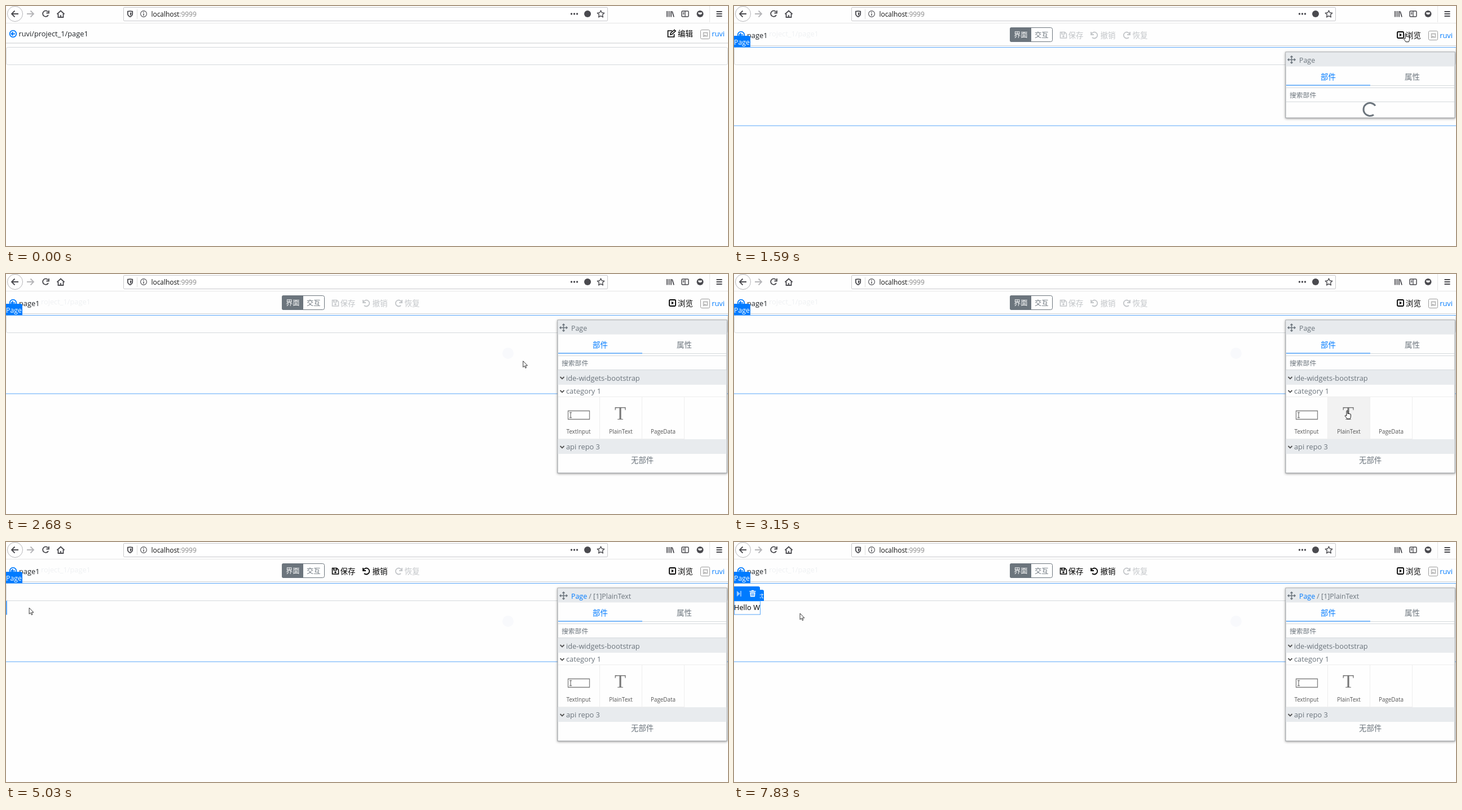
Animation of 1280 by 427 pixels, one loop 8 s. Source, as an HTML page:

```html
<!DOCTYPE html>
<html lang="zh-CN">
<head>
<meta charset="utf-8">
<title>Page editor</title>
<style>
html, body { margin: 0; height: 100%; overflow: hidden; background: #fefefe; }
svg { display: block; width: 1280px; height: 427px; font: 12.8px "Open Sans", "Noto Sans CJK SC", "Noto Sans CJK", sans-serif; }
text { white-space: pre; }
.cjk { font-size: 13.4px; }
.tag { font-size: 12.3px; fill: #fff; }
.tiny { font-size: 9.9px; fill: #555; text-anchor: middle; }
.line { fill: none; stroke: currentColor; stroke-width: 1.8; }
.blue { fill: #007bff; }
.edge { fill: none; stroke: #58a6f8; }
.grey { fill: #6c757d; }
.rule { fill: none; stroke: #d5d9dc; }
.off { color: #c3c6c9; }
.panel { fill: #fefefe; stroke: #9a9ea2; filter: drop-shadow(0 1px 2px #0006); }
</style>
</head>
<body>
<svg viewBox="0 0 1280 427">
  <defs>
    <path id="undo" class="line" stroke-width="2" d="M1 1v5h5M1.500 5.500A5.500 5.500 0 1 1 3 11"/>
    <path id="chevron" class="line" d="M0 0l3.500 3.500 3.500-3.500" color="#555"/>
    <g id="avatar"><rect x="1231.500" y=".5" width="16" height="16" rx="2" fill="#fff" stroke="#999"/><path class="line" stroke-width="1" color="#bbb" d="M1236.500 5.500h7v6h-7zM1236 13l3-3 3 2"/></g>
    <g id="back" class="line" color="#007bff" stroke-width="1.500"><circle r="5.800"/><path d="M3.500 0h-6M0-3l-3 3 3 3"/></g>
  </defs>

  <!-- browser bar -->
  <g color="#4a4a4f">
    <path d="M0 30.500H1280" stroke="#e6e6e6"/>
    <path d="M1247.500 0V29" stroke="#e6e6e6"/>
    <circle cx="16" cy="14" r="13.500" fill="#fff" stroke="#b5b5b8"/>
    <path class="line" d="M22 14H10M15.500 8.500L10 14l5.500 5.500"/>
    <path class="line" color="#b5b5b8" d="M37 14h12M43.500 8.500L49 14l-5.500 5.500"/>
    <path class="line" d="M74.500 10.500A5.200 5.200 0 1 0 75 16M76 8v4.500h-4.500"/>
    <path class="line" d="M90.500 14.500L97 8.500l6.500 6M92.500 14v6h9v-6M97 20v-4"/>
    <rect x="208.500" y="2.500" width="858" height="24" rx="1.500" fill="#fff" stroke="#c9c9cc"/>
    <path class="line" stroke-width="1.500" d="M215.800 9.700q4.200-1 8.400 0v4q0 3.500-4.200 5.500-4.200-2-4.200-5.500z"/>
    <path d="M220 11.500l2.300.3v2.500q-.3 2-2.300 3z" fill="#4a4a4f"/>
    <path d="M232.500 6V23" stroke="#ddd"/>
    <circle class="line" stroke-width="1" style="stroke-width:1.100" cx="244" cy="14" r="5.400"/>
    <path d="M244 10.500v1.600M244 13.300v4" stroke="#4a4a4f" stroke-width="1.400"/>
    <text x="257.500" y="18.500" font-size="11.900" fill="#111">localhost<tspan fill="#888">:9999</tspan></text>
    <g fill="#4a4a4f"><circle cx="1002.500" cy="14" r="1.700"/><circle cx="1007.500" cy="14" r="1.700"/><circle cx="1012.500" cy="14" r="1.700"/><circle cx="1031" cy="14" r="6"/></g>
    <path class="line" stroke-linejoin="round" style="stroke-width:1.400" d="M1054.500 8l1.900 4 4.300.5-3.200 3 .9 4.400-3.900-2.200-3.900 2.200.9-4.400-3.200-3 4.300-.5z"/>
    <path class="line" d="M1172 9v10.500M1175.500 9v10.500M1179 9v10.500M1181 9.500l3 10"/>
    <rect class="line" style="stroke-width:1.500" x="1198" y="9" width="12" height="10" rx="1.500"/>
    <path class="line" style="stroke-width:1.300" d="M1204 9v10M1200 11.800h2.500M1200 14h2.500"/>
    <circle cx="1230.500" cy="14" r="6" fill="#4a4a4f"/>
    <path d="M1227 11.500h7q0 3.800-3.500 3.800t-3.500-3.800z" fill="#fff"/>
    <path class="line" d="M1259.500 10h10M1259.500 14h10M1259.500 18h10"/>
  </g>

  <!-- page being edited -->
  <rect class="rule" x=".5" y="73.500" width="1279" height="31" rx="3"/>

  <g id="view">
    <path d="M0 66H1280" stroke="#dadcde" stroke-width="1.500"/>
    <use href="#back" x="12.500" y="49.500"/>
    <text x="22.500" y="54" fill="#212529">ruvi/project_1/page1</text>
    <path class="line" d="M1181 44h-7.500v11h11v-5M1178 51l.5-3 6.500-5.500 2 2-6.500 6z" color="#000" style="stroke-width:1.600"/>
    <text class="cjk" x="1191" y="54">编辑</text>
    <use href="#avatar" y="42"/>
    <text class="blue" x="1274" y="54" text-anchor="end">ruvi</text>
  </g>

  <g id="edit">
    <path d="M0 70.500H1280" stroke="#d0d3d6"/>
    <text x="62" y="54" fill="#eff1f3">roject_1/page1</text>
    <use href="#back" x="12.500" y="51.500"/>
    <text x="23" y="56.500" fill="#212529">page1</text>
    <rect x="489.500" y="38.500" width="75" height="25" rx="3" fill="#fff" stroke="#6c757d"/>
    <path class="grey" d="M527 38v26h-35q-3 0-3-3V41q0-3 3-3z"/>
    <text x="496" y="56" font-size="12.300" fill="#fff">界面</text>
    <text x="533" y="56" font-size="12.300" class="grey">交互</text>
    <g id="tools" class="cjk" fill="currentColor">
      <path class="line" style="stroke-width:1.500" d="M578.500 46.500h8l3 3v7.500h-11zM581 46.500v3.500h5v-3.500"/><circle cx="584" cy="53.700" r="1.800"/>
      <text x="592.500" y="56.500">保存</text>
      <use href="#undo" x="632" y="45"/>
      <text x="649.500" y="56.500">撤销</text>
    </g>
    <g class="cjk off" fill="currentColor">
      <use href="#undo" transform="translate(703 45) scale(-1 1)"/>
      <text x="706.500" y="56.500">恢复</text>
    </g>
    <rect class="line" color="#000" x="1176" y="46" width="11" height="11" rx="1.500"/><path d="M1180 48.500v6l4-3z"/>
    <text class="cjk" x="1191" y="56.500">浏览</text>
    <use href="#avatar" y="44"/>
    <text class="blue" x="1274" y="56.500" text-anchor="end">ruvi</text>
    <circle id="trace" cx="890" cy="141" r="10" fill="#f8f9fc"/>

    <g id="frame">
      <path class="edge" d="M0 73.500H1280M0 213H1280"/>
      <g id="pageTag"><path class="blue" d="M0 73V53h26q3 0 3 3v17z"/><text class="tag" x="0" y="69">Page</text></g>
      <g id="inputTag"><path class="edge" d="M.5 73.500H1279.500V104.500H.5z"/><path class="blue" d="M0 73V53h51q3 0 3 3v17z"/><text class="tag" x="0" y="69">TextInput</text></g>
    </g>

    <g id="plainTag"><path class="blue" d="M0 105V85h50q3 0 3 3v17z"/><text class="tag" x="1" y="100">PlainText</text></g>
    <text id="content" x="0" y="121"></text>
    <rect id="outline" class="edge" x=".5" y="105" height="24"/>
    <g id="actions">
      <path class="blue" d="M-75 105V79h72q3 0 3 3v23z"/>
      <g fill="#fff">
        <path fill-opacity=".6" d="M-57 87v10l-6-5zM-65 87h1.700v10h-1.700zM-41 87v10l6-5zM-34.700 87h1.700v10h-1.700z"/>
        <path d="M-18.500 87h3l1-1.200h3l1 1.200h3v1.600h-11zM-17.700 89.500h9.400l-.7 8h-8z"/>
      </g>
      <path d="M-15 91v5M-13 91v5M-11 91v5" stroke="#007bff"/>
    </g>

    <!-- widget panel -->
    <rect id="panel" class="panel" x="978" y="82" width="300"/>
    <path d="M978.500 82.500h299v25h-299z" fill="#e7eaed"/>
    <path class="line" color="#6c757d" style="stroke-width:1.500" d="M982 95.500h13M988.500 89v13M984 93.500l-2 2 2 2M993 93.500l2 2-2 2M986.500 91l2-2 2 2M986.500 100l2 2 2-2"/>
    <text id="title" class="grey" x="1002" y="100.500" font-size="12.400"><tspan id="root">Page</tspan><tspan id="leaf"> / [1]PlainText</tspan></text>
    <text class="cjk blue" x="1040" y="130.500">部件</text>
    <text class="cjk grey" x="1189" y="130.500">属性</text>
    <path class="rule" d="M1128 141.500h149M979 145.500h298M979 170.500h298"/>
    <path d="M979 141h149" stroke="#4d9ff7" stroke-width="1.500"/>
    <text class="grey" x="985" y="163" font-size="11.800">搜索部件</text>
    <circle id="spinner" cx="1127.500" cy="184" r="11.500" fill="none" stroke="#6c757d" stroke-width="3" pathLength="4" stroke-dasharray="3 1"/>
    <g id="widgets">
      <path d="M978.500 171h299v26h-299zM978.500 294h299v26h-299z" fill="#e8ebee"/>
      <rect id="hover" x="1053" y="218" width="75" height="75" fill="#f2f2f2"/>
      <path d="M979 218.500h298M979 293.500h224M1052.500 218v75M1127.500 218v75M1202.500 218v75" stroke="#eee"/>
      <use href="#chevron" x="982.500" y="183"/><use href="#chevron" x="982.500" y="207"/><use href="#chevron" x="982.500" y="306"/>
      <text class="grey" x="993" y="189.500">ide-widgets-bootstrap</text>
      <text class="grey" x="993" y="213">category 1</text>
      <text class="grey" x="993" y="312">api repo 3</text>
      <text class="cjk grey" x="1108" y="336">无部件</text>
      <path class="line" color="#808080" style="stroke-width:1.300" d="M996.500 243.500h38v15h-38zM999 246.500h4M1001 246.500v9M999 255.500h4"/>
      <text x="1089" y="259" fill="#777" text-anchor="middle" style="font:33px 'Liberation Serif',serif">T</text>
      <text class="tiny" x="1015" y="283.500">TextInput</text>
      <text class="tiny" x="1090" y="283.500">PlainText</text>
      <text class="tiny" x="1165" y="283.500">PageData</text>
    </g>
  </g>

  <g id="pointer">
    <circle id="press" r="10" fill="#ffff60"/>
    <path id="arrow" d="M0 0v11l2.500-2.300 1.700 3.900 1.700-.8-1.700-3.700h3.600z" fill="#fff" stroke="#222" stroke-width=".9"/>
    <path id="hand" d="M-1 1q0-1 1-1t1 1v4.500q1-.8 2 .2 1.200-.6 2 .4 1.500-.3 1.500 1.200v3q0 2-1.500 4.500h-5q-1-2-3.800-5.200 0-2 2.800-.5z" fill="#fff" stroke="#111"/>
    <path id="beam" d="M-2 0h4M0 0v11M-2 11h4" stroke="#222" fill="none"/>
  </g>
</svg>
<script>
const $ = id => document.getElementById(id);
const show = (id, on) => { $(id).style.display = on ? '' : 'none'; };
const within = (t, a, b) => t >= a && t < b;

// pointer path: time, x, y
const path = [
  [0, 1207, 440], [279, 1207, 440], [280, 1207, 424], [600, 1206, 423], [780, 1140, 270],
  [1050, 1188, 78], [1209, 1188, 78], [1210, 1191, 49], [1670, 1191, 49], [1990, 978, 92],
  [2070, 955, 92], [2130, 932, 91], [2360, 932, 91], [2530, 890, 141], [2620, 890, 141],
  [3070, 1087, 243], [3710, 1087, 243], [4250, 38, 118], [4480, 40, 117], [5030, 40, 117],
  [5100, 117, 127], [8000, 117, 127]
];
// text in the new element: time, value
const typing = [
  [3550, '双击输入文本'], [4780, ''], [5730, 'H'], [6280, 'He'], [6800, 'Hel'],
  [6970, 'Hell'], [7200, 'Hello'], [7440, 'Hello '], [7760, 'Hello W']
];

function locate(t) {
  const i = path.findIndex(p => p[0] > t);
  const [t0, x0, y0] = path[i - 1], [t1, x1, y1] = path[i];
  const k = (t - t0) / (t1 - t0);
  return [x0 + (x1 - x0) * k, y0 + (y1 - y0) * k];
}

function draw(t) {
  const [x, y] = locate(t);
  const editing = t >= 1400, loaded = t >= 1670, added = t >= 3550;
  const selected = t >= 4630, typed = t >= 5730;
  const overInput = within(t, 1990, 2430);
  const overText = within(t, 4130, 5030);
  const overTile = within(t, 3000, 3760);

  show('view', !editing);
  show('edit', editing);
  show('trace', t >= 2620);
  show('frame', !within(t, 4630, 5030));
  show('pageTag', !overInput);
  show('inputTag', overInput);
  $('tools').setAttribute('class', added ? 'cjk' : 'cjk off');

  show('spinner', !loaded);
  show('widgets', loaded);
  show('hover', overTile);
  $('panel').setAttribute('height', loaded ? 272 : 117);
  $('spinner').setAttribute('transform', `rotate(${55 + (t - 1590) * .48} 1127.5 184)`);
  show('leaf', selected);
  $('root').setAttribute('class', selected ? 'blue' : 'grey');

  const step = typing.filter(s => s[0] <= t).pop();
  const content = $('content');
  content.textContent = step ? step[1] : '';
  content.setAttribute('class', typed ? '' : 'cjk grey');
  const width = step && step[1] ? content.getComputedTextLength() : 1;
  $('outline').setAttribute('width', width);
  $('actions').setAttribute('transform', `translate(${width})`);
  show('outline', added && (overText || selected));
  show('plainTag', within(t, 4130, 4780) || typed);
  show('actions', within(t, 4630, 4780) || typed);

  const overButton = within(t, 1210, 1720);
  $('pointer').setAttribute('transform', `translate(${x} ${y})`);
  show('press', within(t, 1210, 1290) || within(t, 2300, 2590) || within(t, 3470, 3550));
  show('hand', overButton || overTile);
  show('beam', overText);
  show('arrow', !overButton && !overTile && !overText);
}

function frame() {
  draw(performance.now() % 8000);
  requestAnimationFrame(frame);
}
frame();
</script>
</body>
</html>
```
